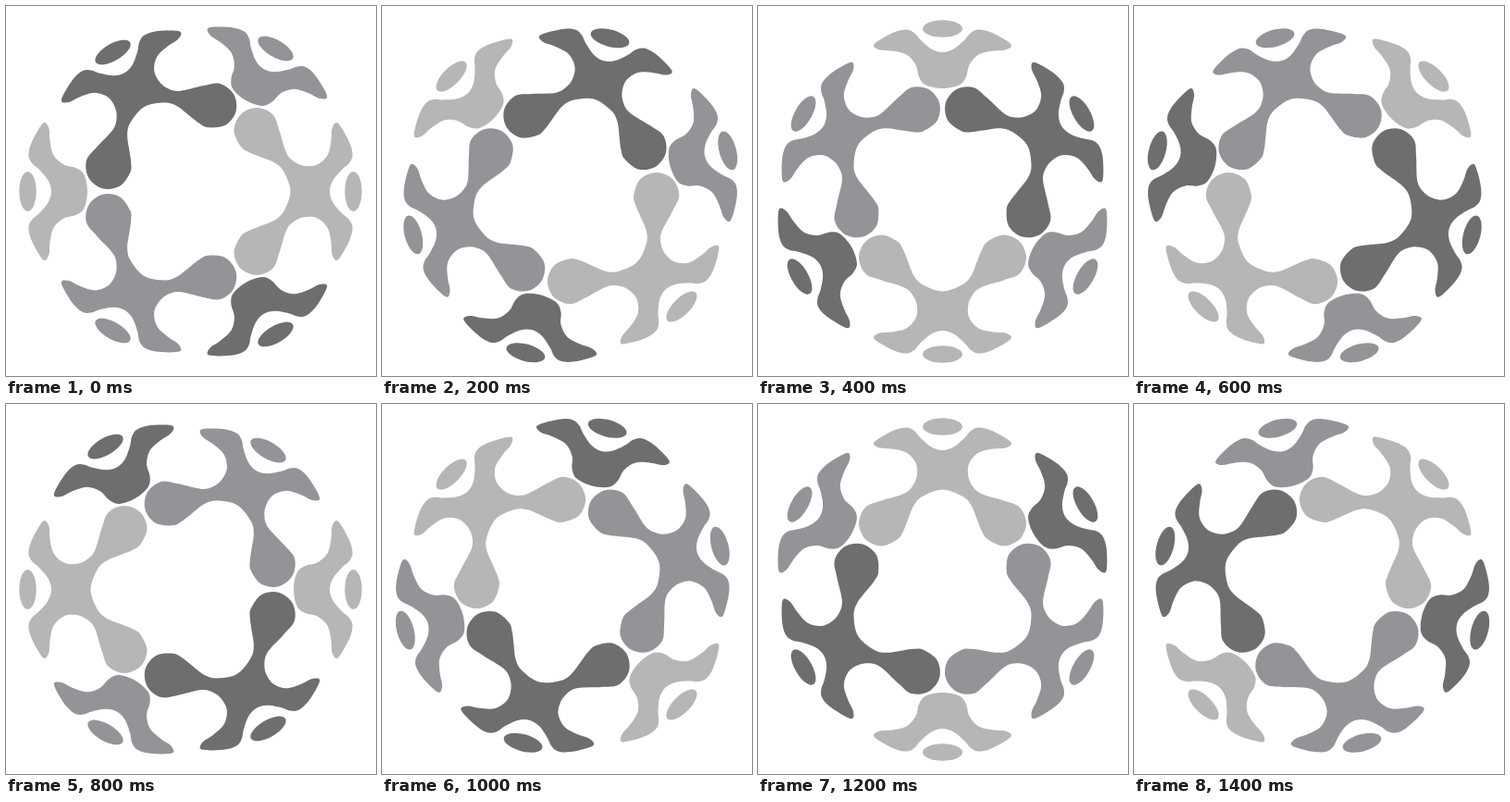
Recreate the animation shown at these times as an HTML page. Size 400 px wide and 400 px high, loop 1.6 s.

```html
<!DOCTYPE html>
<html>
<head>
<meta charset="utf-8">
<style>
html, body { margin: 0; width: 100%; height: 100%; overflow: hidden; background: #fff; }
svg { display: block; width: 100vw; height: 100vh; }
</style>
</head>
<body>
<svg viewBox="0 0 400 400"><g id="ring"></g></svg>
<script>
const ring = document.getElementById('ring');
const CX = 199.5, CY = 200.5;

// Key points of half an outline: x points away from the centre, y is mirrored.
const knob = Array.from({ length: 6 }, (_, i) => {
  const a = -(135 + 45 * i) * Math.PI / 180;
  return [71.5 + 24.5 * Math.cos(a), 66 + 24.5 * Math.sin(a)];
});
const arm = [[137, 29], [148, 39], [152, 55], [153, 68], [158, 74.5], [165, 66],
  [173, 50], [175, 38], [171, 30], [164, 24], [154, 12], [150.5, 0]];
const big = [[108, 0], [101, 21], [91, 31], [74, 38], [63, 42.5], ...knob,
  [104, 41], [114, 31], [125, 27.5], ...arm];
const small = [[111.5, 0], [115, 18], [124, 25.5], ...arm];

// Mirrors the half and runs a smooth closed curve through every point.
function outline(half) {
  const pts = [...half, ...half.slice(1, -1).reverse().map(([x, y]) => [x, -y])];
  const at = i => pts[(i + pts.length) % pts.length];
  const handle = (i, dir) =>
    at(i).map((c, k) => c + dir * (at(i + 1)[k] - at(i - 1)[k]) / 6);
  const curves = pts.map((_, i) => `C${handle(i, 1)} ${handle(i + 1, -1)} ${at(i + 1)}`);
  return `M${pts[0]}${curves.join('')}Z`;
}

const tones = [
  { color: '#b6b6b6', x: 0, y: 0 },
  { color: '#6e6e70', x: 4, y: 2 },
  { color: '#939498', x: 4, y: -2 }
];

for (let i = 0; i < 6; i++) {
  const { color, x, y } = tones[i % 3];
  ring.innerHTML += `<g fill="${color}" transform="translate(${x} ${y}) rotate(${i * 60})">
    <path d="${outline(i % 2 ? small : big)}"/>
    <ellipse cx="176" rx="9.2" ry="21.5"/></g>`;
}

// An eighth of a turn every 200 ms.
function draw() {
  const step = Math.floor(performance.now() / 200) % 8;
  ring.setAttribute('transform', `translate(${CX} ${CY}) rotate(${step * 45})`);
  requestAnimationFrame(draw);
}
draw();
</script>
</body>
</html>
```
